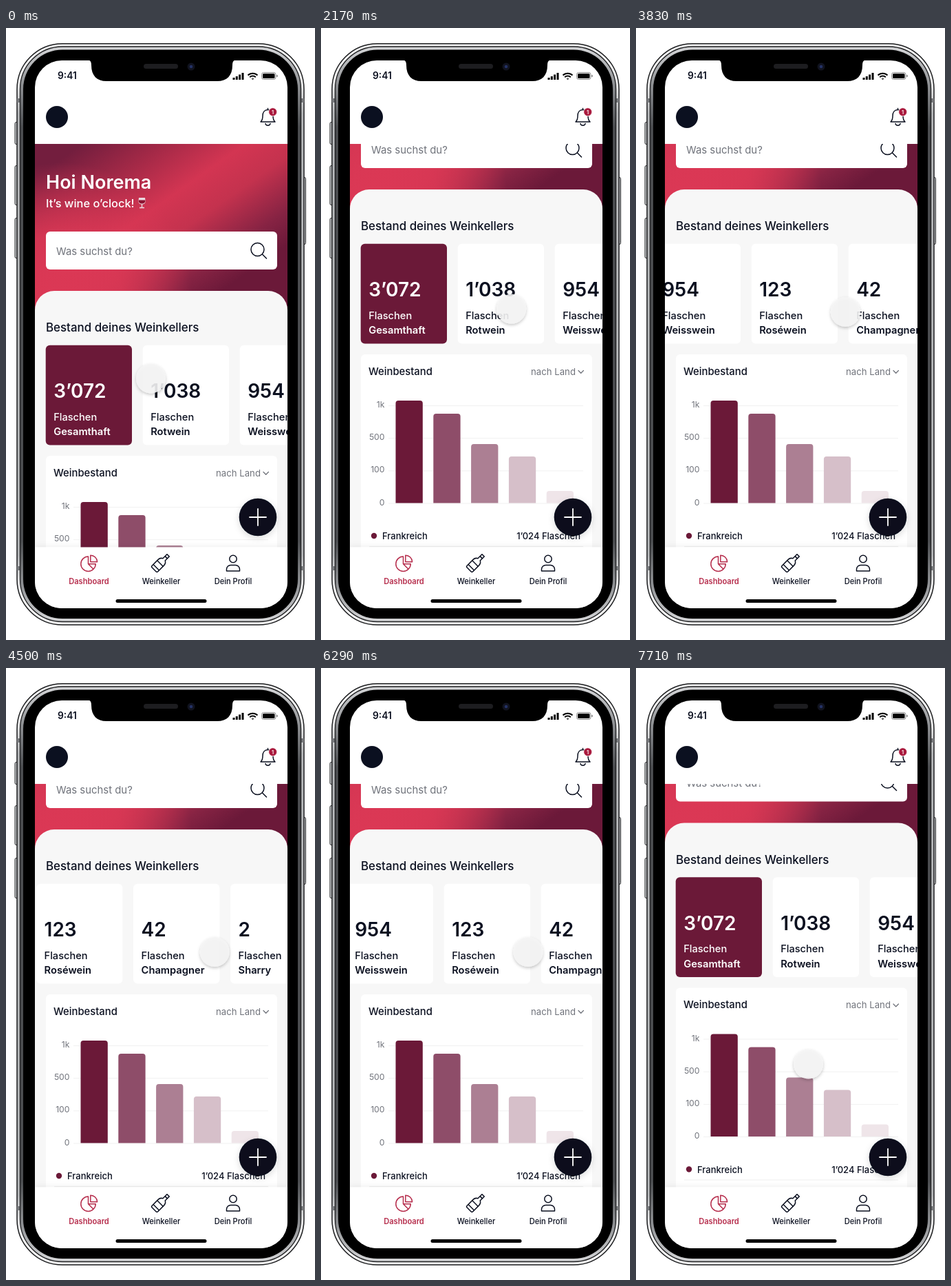
These frames come from a looping animation (449x887 px, 8 s). An HTML page:

```html
<!DOCTYPE html>
<html lang="de">
<head>
<meta charset="utf-8">
<title>Weinkeller</title>
<style>
  html, body { margin: 0; width: 100%; height: 100%; overflow: hidden; background: #fff; }
  svg { display: block; width: 100%; height: 100%; }
  text { font-family: Inter, "Open Sans", sans-serif; font-weight: 500; fill: #0b1020; }
  .line { fill: none; stroke: #0b1020; stroke-width: 1.5; stroke-linecap: round; stroke-linejoin: round; }
  .bold { font-weight: 600; }
  .muted { fill: #70737b; font-weight: 400; }
  .light { fill: #fff; }
</style>
</head>
<body>
<svg viewBox="0 0 449 887">
  <defs>
    <linearGradient id="hero" gradientUnits="userSpaceOnUse" x1="116" y1="164" x2="284" y2="402">
      <stop offset="0" stop-color="#731e3e"/>
      <stop offset=".24" stop-color="#a42947"/>
      <stop offset=".47" stop-color="#d33552"/>
      <stop offset=".64" stop-color="#c4324e"/>
      <stop offset=".86" stop-color="#862343"/>
      <stop offset="1" stop-color="#6b1939"/>
    </linearGradient>
    <radialGradient id="blush" gradientUnits="userSpaceOnUse" cx="80" cy="385" r="190">
      <stop offset="0" stop-color="#db3855"/>
      <stop offset=".45" stop-color="#db3855" stop-opacity=".85"/>
      <stop offset="1" stop-color="#db3855" stop-opacity="0"/>
    </radialGradient>
    <linearGradient id="chrome" x1="0" x2="0" y1="0" y2="1">
      <stop offset="0" stop-color="#f4f4f4"/>
      <stop offset=".06" stop-color="#f4f4f4"/>
      <stop offset=".12" stop-color="#b4b6b8"/>
      <stop offset=".88" stop-color="#b4b6b8"/>
      <stop offset=".94" stop-color="#f4f4f4"/>
      <stop offset="1" stop-color="#f4f4f4"/>
    </linearGradient>
    <linearGradient id="rim" x1="0" x2="0" y1="0" y2="1">
      <stop offset="0" stop-color="#d5d6d8"/>
      <stop offset=".07" stop-color="#8a8c8f"/>
      <stop offset=".14" stop-color="#4a4c4f"/>
      <stop offset=".86" stop-color="#4a4c4f"/>
      <stop offset=".93" stop-color="#8a8c8f"/>
      <stop offset="1" stop-color="#d5d6d8"/>
    </linearGradient>
    <filter id="soft" x="-50%" y="-50%" width="200%" height="200%">
      <feDropShadow dx="0" dy="2" stdDeviation="2" flood-color="#000" flood-opacity=".25"/>
    </filter>
    <filter id="glow" x="-50%" y="-50%" width="200%" height="200%">
      <feDropShadow dx="0" dy="3" stdDeviation="5" flood-color="#000" flood-opacity=".14"/>
    </filter>
    <filter id="barShadow" x="-5%" y="-20%" width="110%" height="140%">
      <feDropShadow dx="0" dy="0" stdDeviation="4" flood-color="#000" flood-opacity=".09"/>
    </filter>
    <clipPath id="screen"><rect x="42" y="47" width="367" height="794" rx="39"/></clipPath>
    <clipPath id="view"><rect x="42" y="168" width="367" height="585"/></clipPath>
  </defs>

  <!-- phone body -->
  <g fill="#c4c6c8" stroke="#2b2c2e">
    <rect x="13" y="136.500" width="6" height="32" rx="2"/>
    <rect x="13" y="199.500" width="6" height="57" rx="2"/>
    <rect x="13" y="275.500" width="6" height="58" rx="2"/>
    <rect x="429.500" y="216.500" width="6" height="97" rx="2"/>
  </g>
  <rect x="16" y="22.700" width="417" height="842.300" rx="66" fill="url(#chrome)" stroke="#1c1d1f" stroke-width="1.500"/>
  <g fill="#77797c">
    <rect x="16" y="102" width="4" height="6"/><rect x="429" y="102" width="4" height="6"/>
    <rect x="16" y="780" width="4" height="6"/><rect x="429" y="780" width="4" height="6"/>
  </g>
  <rect x="20.500" y="27" width="408" height="833.500" rx="61.500" fill="url(#rim)" stroke="#1c1d1f" stroke-width="1.300"/>
  <rect x="25" y="31.500" width="399" height="824.500" rx="57"/>

  <g clip-path="url(#screen)">
    <rect x="42" y="47" width="367" height="794" fill="#fff"/>

    <g clip-path="url(#view)">
      <g id="page">
        <rect x="42" y="168" width="367" height="260" fill="url(#hero)"/>
        <rect x="42" y="168" width="367" height="260" fill="url(#blush)"/>
        <text class="light bold" x="58" y="233" font-size="27">Hoi Norema</text>
        <text class="light" x="58" y="260" font-size="16.400">It’s wine o’clock!</text>
        <g>
          <path d="M193 246h9l.6 5c0 3-2 4.500-5.100 4.500s-5.100-1.500-5.100-4.500z" fill="#e9d9df"/>
          <path d="M192.700 249.500h9.600c.4 3.500-1.500 5-4.800 5s-5.200-1.500-4.800-5z" fill="#8c1230"/>
          <path d="M197.500 255v5m-3.500.5h7" stroke="#e9d9df" stroke-width="1.400"/>
        </g>
        <rect x="58" y="295" width="336" height="55" rx="6" fill="#fff"/>
        <text class="muted" x="73" y="328.500" font-size="14.900">Was suchst du?</text>
        <path class="line" d="M375 321a9.500 9.500 0 1 1-19 0a9.500 9.500 0 1 1 19 0M372.500 328l6 6"/>

        <path d="M42 1100V409a28 28 0 0 1 28-28H381a28 28 0 0 1 28 28V1100z" fill="#f7f7f7"/>
        <text x="58" y="440" font-size="16.900">Bestand deines Weinkellers</text>
        <g id="cards"></g>

        <rect x="58" y="620" width="336" height="460" rx="6" fill="#fff"/>
        <text x="69" y="649.500" font-size="14.800">Weinbestand</text>
        <text class="muted" x="305" y="649.500" font-size="13.200">nach Land</text>
        <path class="line" d="M374 643.500l3.700 3.700l3.700-3.700" style="stroke:#70737b;stroke-width:1.300"/>
        <g id="chart"></g>
        <circle cx="77" cy="883" r="4.200" fill="#6b1938"/>
        <text x="89" y="888" font-size="13">Frankreich</text>
        <text x="377" y="888" font-size="13" text-anchor="end">1’024 Flaschen</text>
        <path d="M70 898.500H381" stroke="#efefef"/>
      </g>
    </g>

    <!-- header -->
    <circle cx="74" cy="129" r="16" fill="#0b1020"/>
    <path class="line" d="M370 136c2.500-2 3-4 3-8.500c0-5.500 2.800-9 7.500-9s7.500 3.500 7.500 9c0 4.500.5 6.500 3 8.500zM377 138.500c.5 3.600 6.500 3.600 7 0M380.500 118v-1.500"/>
    <circle cx="387.700" cy="121.700" r="6" fill="#a9193d" stroke="#fff" stroke-width=".8"/>
    <text class="light bold" x="387.700" y="124.500" font-size="7.500" text-anchor="middle">1</text>

    <!-- status bar -->
    <text class="bold" x="75" y="74" font-size="13.800">9:41</text>
    <path d="M331 72v3M335.300 70v5M339.600 67.500v7.500M344 65v10" stroke="#000" stroke-width="3"/>
    <g fill="none" stroke="#000" stroke-width="2">
      <path d="M351.500 68.500a10 10 0 0 1 14 0M354.200 71.300a6.200 6.200 0 0 1 8.600 0"/>
      <path d="M357.200 73.500a2 2 0 0 1 2.600 0l-1.300 1.300z" stroke-width="1"/>
    </g>
    <rect x="371.500" y="64.500" width="20.500" height="10" rx="3" fill="none" stroke="#888"/>
    <rect x="373" y="66" width="17.500" height="7" rx="1.500"/>
    <path d="M394 68v3" stroke="#888" stroke-width="1.500"/>
    <path d="M116 46c6 0 8 2 8 8c0 15 8 23 22 23H307c14 0 22-8 22-23c0-6 2-8 8-8z"/>
    <rect x="200" y="52" width="50" height="7" rx="3.500" fill="#1d1d20"/>
    <circle cx="269" cy="56" r="5.500" fill="#11131f"/>
    <circle cx="269" cy="56" r="2.300" fill="#243266"/>

    <!-- floating button and tab bar -->
    <g filter="url(#glow)"><circle cx="366" cy="709" r="27.300" fill="#070c1c"/></g>
    <path d="M354 709h24M366 697v24" stroke="#fff" stroke-width="1.800" stroke-linecap="round"/>
    <rect x="42" y="752.500" width="367" height="89" fill="#fff" filter="url(#barShadow)"/>
    <g class="line" style="stroke:#b62d4c">
      <path d="M119.500 766a10.700 10.700 0 1 0 10.700 10.700h-10.700zM119.500 776.700l7.500 7.500"/>
      <path d="M122.800 764.200a9.800 9.800 0 0 1 9.800 9.600h-9.800z"/>
    </g>
    <g class="line" transform="translate(225 775) rotate(45)">
      <path d="M-2.300-15h4.600v8.500c3 1.500 3.700 3.500 3.700 6V12a2 2 0 0 1-2 2h-8a2 2 0 0 1-2-2V-.5c0-2.500.7-4.500 3.700-6zM-2.300-11h4.600M-6 1.500h12M-6 9.500h12"/>
    </g>
    <g class="line">
      <circle cx="330" cy="769.500" r="5.200"/>
      <path d="M320.500 787v-2.500a6 6 0 0 1 6-6h7a6 6 0 0 1 6 6v2.500z"/>
    </g>
    <g font-size="11.100" text-anchor="middle">
      <text class="bold" x="120.500" y="805.500" style="fill:#b62d4c">Dashboard</text>
      <text x="225.500" y="805.500">Weinkeller</text>
      <text x="330" y="805.500">Dein Profil</text>
    </g>
    <rect x="159.500" y="828" width="132" height="5" rx="2.500"/>
  </g>

  <g id="pointer" filter="url(#soft)"><circle r="21.500" fill="#f5f5f5" fill-opacity=".88"/></g>
</svg>

<script>
const LOOP = 8000;
const $ = id => document.getElementById(id);

const stock = [
  ["3’072", "Gesamthaft"], ["1’038", "Rotwein"], ["954", "Weisswein"],
  ["123", "Roséwein"], ["42", "Champagner"], ["2", "Sharry"]
];
$("cards").innerHTML = stock.map(([count, kind], i) => {
  const x = 57.7 + 141 * i, tone = i ? "" : "light";
  return `<rect x="${x}" y="459.700" width="125.300" height="144.800" rx="6" fill="${i ? "#fff" : "#6b1938"}"/>
    <text class="bold ${tone}" x="${x + 11.5}" y="536" font-size="28">${count}</text>
    <text class="${tone}" x="${x + 11.5}" y="568.500" font-size="14.600">Flaschen</text>
    <text class="bold ${tone}" x="${x + 11.5}" y="590" font-size="14.700">${kind}</text>`;
}).join("");

const grid = ["1k", "500", "100", "0"].map((label, i) => {
  const y = 693.5 + 47.2 * i;
  return `<path d="M98 ${y + 1}H381" stroke="#f1f1f1"/>
    <text class="muted" x="92.500" y="${y + 3.5}" font-size="12.200" text-anchor="end">${label}</text>`;
});
const bars = [[687, "#6b1938"], [706, "#8e4d69"], [750, "#ac7f93"], [768, "#d6bfc9"], [818, "#efe5e9"]]
  .map(([top, fill], i) =>
    `<path d="M${108.5 + 54.8 * i} 835.500V${top + 4}q0-4 4-4h31.300q4 0 4 4V835.500z" fill="${fill}"/>`);
$("chart").innerHTML = grid.join("") + bars.join("");

const smooth = p => p * p * (3 - 2 * p);
const glide = p => 1 - (1 - p) ** 2.25;

// Each move is [start, end, distance, easing]; a track is its start value plus all moves so far.
const track = (start, moves) => t => moves.reduce((sum, [from, to, by, ease = smooth]) =>
  sum + by * ease(Math.min(1, Math.max(0, (t - from) / (to - from)))), start);

const scrollY = track(0, [[1290, 1670, 147, glide], [7500, 7710, 9.5]]);
const scrollX = track(0, [[2550, 3830, 313], [3960, 4830, 182], [5735, 7040, -495]]);
const pointerX = track(210.5, [[0, 830, -4.5], [1880, 2330, 99], [2960, 6290, -4], [7460, 7710, -50.5]]);
const pointerY = track(508, [[0, 830, -112], [1880, 2330, 15.5], [7460, 7710, 162.5]]);

const move = (id, x, y) => $(id).setAttribute("transform", `translate(${x} ${y})`);

function draw(t) {
  move("page", 0, -scrollY(t));
  move("cards", -scrollX(t), 0);
  move("pointer", pointerX(t), pointerY(t));
}

const begin = performance.now();
function frame() {
  draw((performance.now() - begin) % LOOP);
  requestAnimationFrame(frame);
}
draw(0);
requestAnimationFrame(frame);
</script>
</body>
</html>
```
